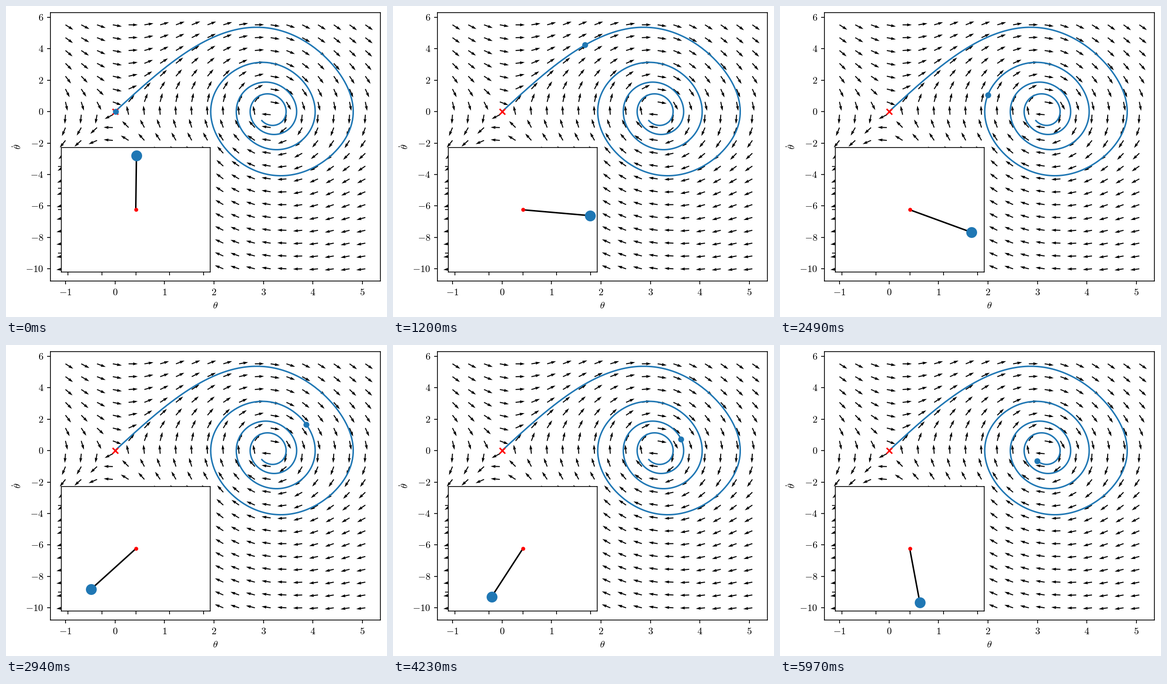
Write a matplotlib script that moves like this. It is 806 px wide and 657 px high and loops after 6000 ms.

```python
import matplotlib.pyplot as plt
import numpy as np
from matplotlib.animation import FuncAnimation

W, H, DPI = 806, 657, 150
G, DAMPING = 9.81, 0.5
FRAMES, SUBSTEPS, DURATION = 200, 5, 10.0
ROD = 0.5
BLUE = "tab:blue"

plt.rcParams["mathtext.fontset"] = "cm"


def flow(state):
    """Damped pendulum, with the angle measured from the upright pose."""
    theta, omega = state
    return np.array([omega, G * np.sin(theta) - DAMPING * omega])


def integrate(state, n, dt):
    path = [np.array(state)]
    for _ in range(n - 1):
        s = path[-1]
        k1 = flow(s)
        k2 = flow(s + dt / 2 * k1)
        k3 = flow(s + dt / 2 * k2)
        k4 = flow(s + dt * k3)
        path.append(s + dt / 6 * (k1 + 2 * k2 + 2 * k3 + k4))
    return np.array(path).T


n_points = FRAMES * SUBSTEPS
theta, omega = integrate((0.0102, 0.0), n_points, DURATION / (n_points - 1))

# the tiny surplus keeps the pixel size from rounding down
fig = plt.figure(figsize=((W + 1e-6) / DPI, (H + 1e-6) / DPI), dpi=DPI,
                 facecolor="white")


def pixel_axes(left, top, right, bottom, xlim, ylim):
    ax = fig.add_axes([left / W, 1 - bottom / H,
                       (right - left) / W, (bottom - top) / H])
    ax.set(xlim=xlim, ylim=ylim)
    ax.tick_params(labelbottom=False, labelleft=False)
    return ax


def label(x, y, text, **style):
    fig.text(x / W, 1 - y / H, f"${text}$", fontsize=10, va="baseline", **style)


# phase plane
X_RANGE, Y_RANGE = (-1.304, 5.364), (-10.776, 6.296)
LEFT, TOP, RIGHT, BOTTOM = 94, 14, 792, 581
plane = pixel_axes(LEFT, TOP, RIGHT, BOTTOM, X_RANGE, Y_RANGE)

x_ticks, y_ticks = range(-1, 6), range(-10, 7, 2)
plane.set_xticks(x_ticks)
plane.set_yticks(y_ticks)
x_scale = (RIGHT - LEFT) / (X_RANGE[1] - X_RANGE[0])
y_scale = (BOTTOM - TOP) / (Y_RANGE[1] - Y_RANGE[0])
for v in x_ticks:
    label(LEFT + (v - X_RANGE[0]) * x_scale, 611, v, ha="center")
for v in y_ticks:
    label(79.5, TOP + (Y_RANGE[1] - v) * y_scale + 7, v, ha="right")
label(443, 639, r"\theta", ha="center")
label(32, 297.5, r"\dot{\theta}", ha="center", rotation=90,
      rotation_mode="anchor")

gx, gy = np.meshgrid(np.linspace(-1, 5.06, 20), np.linspace(-10, 5.52, 20))
u, v = flow((gx, gy))
norm = np.hypot(u, v)
plane.quiver(gx, gy, u / norm, v / norm, angles="xy")
plane.plot(theta, omega, color=BLUE, lw=1.5)
plane.plot(0, 0, "rx", ms=6, mew=1.5)
dot, = plane.plot([], [], "o", color=BLUE, ms=5)
plane.set(xlim=X_RANGE, ylim=Y_RANGE)

# pendulum inset
inset = pixel_axes(117, 299, 432, 562, (-0.55, 0.55), (-0.575, 0.575))
inset.set_xticks(np.linspace(-0.5, 0.5, 5))
inset.set_yticks(np.linspace(-0.4, 0.4, 5))
rod, = inset.plot([], [], color="black", lw=1.5)
bob, = inset.plot([], [], "o", color=BLUE, ms=10)
inset.plot(0, 0, "r.", ms=6)


def update(frame):
    i = frame * SUBSTEPS
    x, y = ROD * np.sin(theta[i]), ROD * np.cos(theta[i])
    dot.set_data([theta[i]], [omega[i]])
    rod.set_data([0, x], [0, y])
    bob.set_data([x], [y])
    return dot, rod, bob


anim = FuncAnimation(fig, update, frames=FRAMES, interval=30,
                     repeat=True, repeat_delay=0)
plt.show()
```
